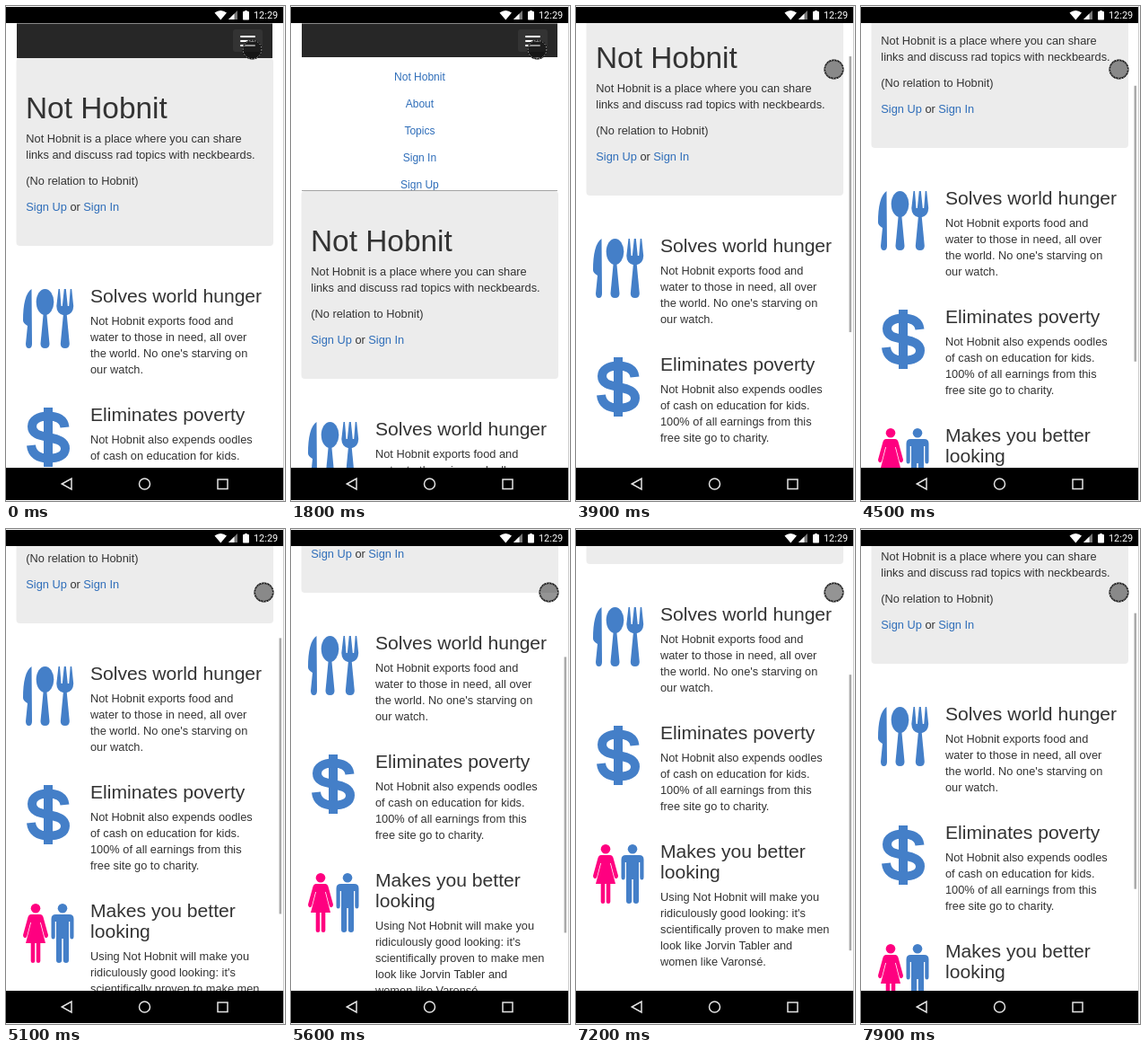
An HTML page with a canvas for the animation above (8 s loop, 311 by 551 pixels).

```html
<!DOCTYPE html>
<html lang="en">
<head>
<meta charset="utf-8">
<title>Mobile page demo</title>
<style>
  html, body { margin: 0; width: 100%; height: 100%; overflow: hidden; background: #fff; }
  canvas { display: block; width: 311px; height: 551px; }
</style>
</head>
<body>
<canvas id="stage"></canvas>
<script>
const W = 311, H = 551, LOOP = 8000, STEP = 100;
const SANS = '"Liberation Sans", Arial, sans-serif';
const INK = '#333', LINK = '#2e6db9', BLUE = '#447fc8', PINK = '#ff0080';
const MENU_HEIGHT = 166, MENU_MS = 350;
const SITE = 'Not Hobnit';

const canvas = document.getElementById('stage');
const ctx = canvas.getContext('2d');
const dpr = window.devicePixelRatio || 1;
canvas.width = Math.round(W * dpr);
canvas.height = Math.round(H * dpr);

const features = [
  { y: 330, title: ['Solves world hunger'], icon: drawCutlery, body: [
    SITE + ' exports food and', 'water to those in need, all over',
    "the world. No one's starving on", 'our watch.'] },
  { y: 462, title: ['Eliminates poverty'], icon: drawDollar, body: [
    SITE + ' also expends oodles', 'of cash on education for kids.',
    '100% of all earnings from this', 'free site go to charity.'] },
  { y: 594, title: ['Makes you better', 'looking'], icon: drawPeople, body: [
    'Using ' + SITE + ' will make you', "ridiculously good looking: it's",
    'scientifically proven to make men', 'look like Jorvin Tabler and', 'women like Varonsé.'] }
];

// [time, scroll offset]
const scrollKeys = [[3440, 0], [3900, 56], [5100, 162], [6200, 236], [6600, 288],
                    [6960, 288], [7200, 228], [7900, 117], [8000, 101]];

const clamp01 = v => Math.min(1, Math.max(0, v));

function track(keys, t) {
  if (t <= keys[0][0]) return keys[0][1];
  for (let i = 1; i < keys.length; i++) {
    const [t0, v0] = keys[i - 1], [t1, v1] = keys[i];
    if (t <= t1) return v0 + (v1 - v0) * (t - t0) / (t1 - t0);
  }
  return keys[keys.length - 1][1];
}

// cubic-bezier(.25, .1, .25, 1)
function ease(x) {
  if (x <= 0) return 0;
  if (x >= 1) return 1;
  let lo = 0, hi = 1;
  for (let i = 0; i < 24; i++) {
    const u = (lo + hi) / 2;
    if (0.75 * u * (1 - u) + u ** 3 < x) lo = u; else hi = u;
  }
  return 0.3 * lo * (1 - lo) ** 2 + 3 * lo * lo * (1 - lo) + lo ** 3;
}

function rect(x, y, w, h, color) {
  ctx.fillStyle = color;
  ctx.fillRect(x, y, w, h);
}

function roundBox(x, y, w, h, r, color) {
  ctx.beginPath();
  ctx.roundRect(x, y, w, h, r);
  ctx.fillStyle = color;
  ctx.fill();
}

function disc(x, y, r, color) {
  ctx.beginPath();
  ctx.arc(x, y, r, 0, Math.PI * 2);
  ctx.fillStyle = color;
  ctx.fill();
}

function fillPath(d, color) {
  ctx.fillStyle = color;
  ctx.fill(new Path2D(d));
}

function text(str, x, y, size, color = INK, align = 'left', family = SANS) {
  ctx.font = size + 'px ' + family;
  ctx.textAlign = align;
  ctx.fillStyle = color;
  ctx.fillText(str, x, y);
  return ctx.measureText(str).width;
}

function drawCutlery() {
  const handle = x => fillPath(
    `M${x - 1.6} 340 L${x - 5} 376 Q${x - 5} 381 ${x} 381 Q${x + 5} 381 ${x + 5} 376 L${x + 1.6} 340Z`, BLUE);
  fillPath('M28.5 315 C22 319 19 332 19 350 Q19 353 24 356 L22 376 Q22 381 25.5 381 Q29 381 29 376Z', BLUE);
  ctx.beginPath();
  ctx.ellipse(43.5, 329.5, 9.8, 14.5, 0, 0, Math.PI * 2);
  ctx.fillStyle = BLUE;
  ctx.fill();
  handle(43.5);
  fillPath('M58.5 315 H60 L61.5 334 H62.8 L64.8 315 H66.8 L68.8 334 H70.2 L71.7 315 H73.2 ' +
           'L75.2 334 Q75 342 68 344 H63.5 Q56.5 342 56.3 334Z', BLUE);
  handle(65.8);
}

function drawDollar() {
  rect(42, 447, 10, 66, BLUE);
  ctx.strokeStyle = BLUE;
  ctx.lineWidth = 10;
  ctx.stroke(new Path2D('M65.5 469 C64.5 460 57 456.5 47 456.5 C36 456.5 29 461 29 468 ' +
    'C29 476 36 478 47 480 C59 482.5 66 485 66 492.5 C66 500 58 503.5 47 503.5 C36 503.5 29 499 28 489'));
}

function drawPeople() {
  disc(33, 584.3, 5.3, PINK);
  fillPath('M28 591 H38 Q40.5 591 41.5 594 L47 614 Q47 617 45 617.3 Q43.4 617.3 42.8 615.5 L38.8 600 H38 ' +
    'L44 623 H38.3 V643 Q38.3 645 36 645 Q33.8 645 33.8 643 V623 H32.2 V643 Q32.2 645 30 645 ' +
    'Q27.7 645 27.7 643 V623 H22 L28 600 H27.2 L23.2 615.5 Q22.6 617.3 21 617.3 Q19 617 19 614 ' +
    'L24.5 594 Q25.5 591 28 591Z', PINK);
  disc(63, 584.3, 5.3, BLUE);
  fillPath('M55.5 591 H70.5 Q75.5 591 75.5 596 V616 Q75.5 618.5 73.4 618.5 Q71.3 618.5 71.3 616 V599 H70 ' +
    'V642 Q70 645 67 645 Q63.8 645 63.8 642 V618 H62.2 V642 Q62.2 645 59 645 Q56 645 56 642 ' +
    'V599 H54.7 V616 Q54.7 618.5 52.6 618.5 Q50.5 618.5 50.5 616 V596 Q50.5 591 55.5 591Z', BLUE);
}

function drawNavbar(menu) {
  rect(12, 19, 285, 1, '#888');
  rect(12, 20, 285, 37, '#272727');
  roundBox(253, 26, 33, 25, 3, '#333');
  for (const y of [33, 38, 43]) roundBox(261, y, 17, 2, 1, '#fff');
  rect(12, 57 + menu, 285, 1, menu ? '#a4a4a4' : '#272727');
  if (!menu) return;
  ctx.save();
  ctx.beginPath();
  ctx.rect(12, 57, 285, menu);
  ctx.clip();
  [SITE, 'About', 'Topics', 'Sign In', 'Sign Up'].forEach((label, i) =>
    text(label, 143.4, 83 + 30 * i, 12, LINK, 'center'));
  ctx.restore();
}

function drawContent() {
  roundBox(11.5, 58, 286.5, 209, 4, '#ececec');
  text(SITE, 22, 125, 33.4);
  text(SITE + ' is a place where you can share', 22.3, 152, 12.8);
  text('links and discuss rad topics with neckbeards.', 22.3, 170, 12.8);
  text('(No relation to Hobnit)', 22.3, 199, 12.8);
  let x = 22.3;
  for (const [part, color] of [['Sign Up', LINK], [' or ', INK], ['Sign In', LINK]])
    x += text(part, x, 228, 12.8, color);

  for (const f of features) {
    f.icon();
    f.title.forEach((line, i) => text(line, 94, f.y + 23 * i, 21.1));
    const top = f.y + 25 + 23 * (f.title.length - 1);
    f.body.forEach((line, i) => text(line, 94, top + 18 * i, 12.8));
  }
}

function drawPage(menu, scroll) {
  ctx.save();
  ctx.beginPath();
  ctx.rect(0, 19, 309, 495);
  ctx.clip();
  ctx.translate(0, -scroll);
  drawNavbar(menu);
  ctx.translate(0, menu);
  drawContent();
  ctx.restore();
}

function drawStatusBar() {
  rect(0, 1, 309, 18, '#000');
  fillPath('M232.5 7.5 Q239.3 2.5 246 7.5 L239.3 15.5Z', '#fff');
  fillPath('M258 5 V15 H248Z', '#777');
  fillPath('M254.5 8.5 V15 H248Z', '#fff');
  rect(266, 5, 3, 1.5, '#fff');
  roundBox(264, 6, 7, 9.5, 0.8, '#fff');
  text('12:29', 276, 14, 10.9, '#fff', 'left', 'Roboto, sans-serif');
}

function drawSystemNav() {
  rect(0, 514, 309, 36, '#000');
  ctx.strokeStyle = '#e4e4e4';
  ctx.lineWidth = 1.5;
  ctx.stroke(new Path2D('M62.3 532 L73 526 V538Z'));
  ctx.beginPath();
  ctx.arc(154.5, 532, 6, 0, Math.PI * 2);
  ctx.stroke();
  ctx.strokeRect(236, 527, 11, 10.5);
}

function drawPointer(x, y) {
  disc(x, y, 11, 'rgba(0,0,0,.42)');
  ctx.beginPath();
  ctx.arc(x, y, 10.3, 0, Math.PI * 2);
  ctx.lineWidth = 1.4;
  ctx.strokeStyle = '#111';
  ctx.stroke();
  ctx.lineWidth = 1;
  ctx.strokeStyle = 'rgba(255,255,255,.8)';
  ctx.setLineDash([1.2, 2]);
  ctx.stroke();
  ctx.setLineDash([]);
}

function draw(t) {
  const open = ease((t - 62) / MENU_MS) - ease((t - 1762) / MENU_MS);
  const menu = Math.round(MENU_HEIGHT * open);
  const scroll = Math.round(track(scrollKeys, t));
  const p = clamp01((t - 2600) / 500);
  const move = p * p * (3 - 2 * p);

  ctx.setTransform(dpr, 0, 0, dpr, 0, 0);
  rect(0, 0, W, H, '#fff');
  drawPage(menu, scroll);
  if (t >= 3500) rect(304.5, 21.5 + 0.617 * scroll, 2.5, 307, '#aaa');
  drawPointer(274.5 + 13 * move, 48.5 + 22 * move);
  drawStatusBar();
  drawSystemNav();
  rect(309, 0, 1, H, '#ccc');
}

const start = performance.now();
function frame() {
  const t = (performance.now() - start) % LOOP;
  draw(Math.floor(t / STEP) * STEP);
  requestAnimationFrame(frame);
}
frame();
</script>
</body>
</html>
```
